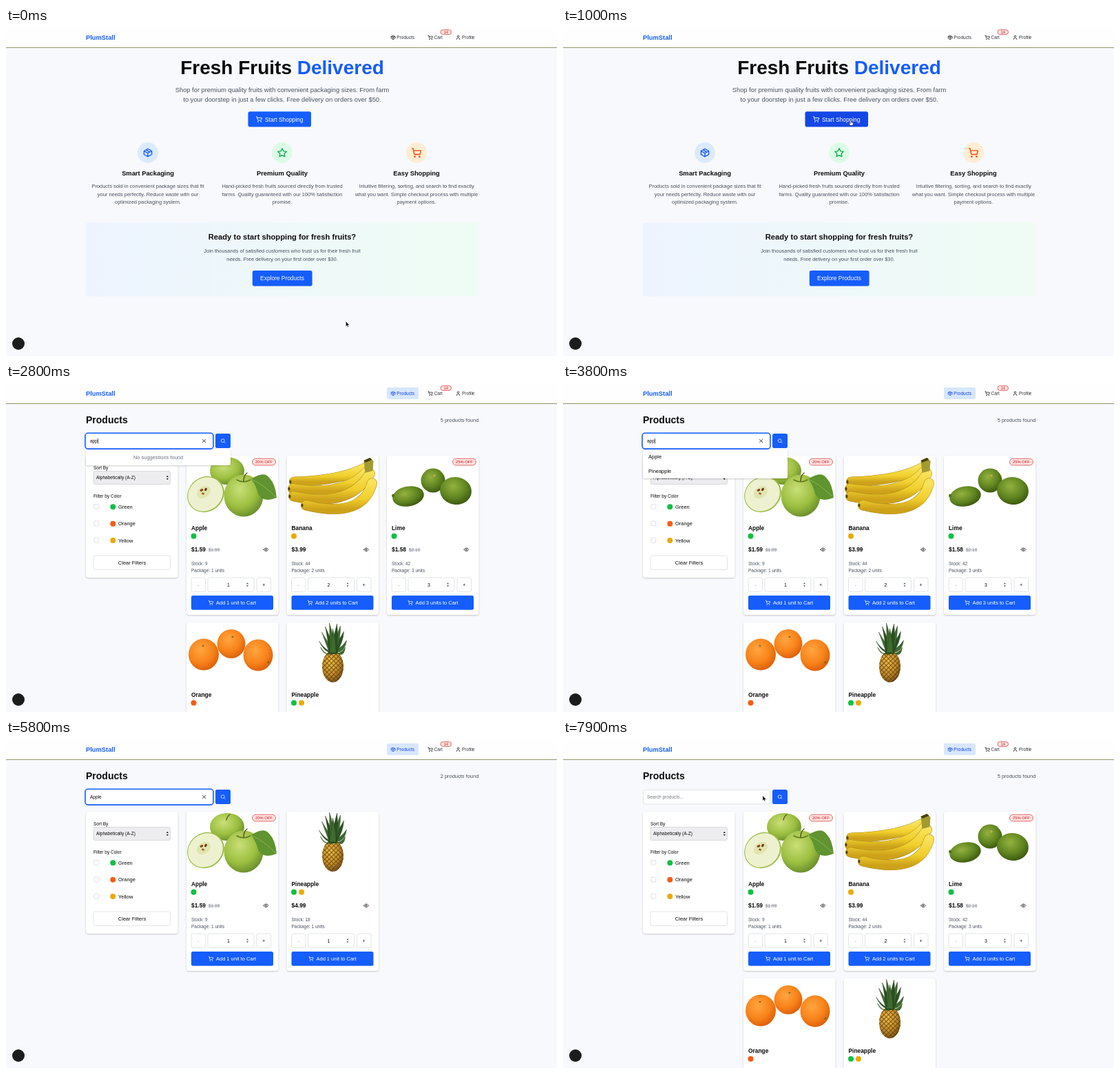
Write an HTML page that moves like this. It is 800x476 px and loops after 8 s.

```html
<!DOCTYPE html>
<html lang="en">
<head>
<meta charset="utf-8">
<title>Fruit store</title>
<style>
html, body { margin: 0; width: 100%; height: 100%; overflow: hidden; background: #f8f9fc; }
svg { display: block; width: 800px; height: 476px; font-family: "Liberation Sans", Arial, sans-serif; }
.card { filter: drop-shadow(0 1px 1.2px #0003); }
.b { font-weight: bold; }
.m { text-anchor: middle; }
.e { text-anchor: end; }
.s { text-decoration: line-through; }
</style>
</head>
<body>
<svg viewBox="0 0 800 476">
  <defs id="defs"></defs>
  <g id="stage"></g>
</svg>
<script>
const BLUE = '#155dfc', DEEP = '#1447e6', INK = '#0c0c0e', GRAY = '#4a5260', PAPER = '#fff', LINE = '#e2e4e8';
const GREEN = '#0fc043', ORANGE = '#f75c10', YELLOW = '#eaaa08', RED = '#c8141c', PINK = '#ffe2e0';

// Drawing helpers
const text = (s, x, y, size, fill = INK, cls = '') =>
  `<text x="${x}" y="${y}" font-size="${size}" fill="${fill}" class="${cls}">${s}</text>`;
const rect = (x, y, w, h, r, fill, stroke = 'none', more = '') =>
  `<rect x="${x}" y="${y}" width="${w}" height="${h}" rx="${r}" fill="${fill}" stroke="${stroke}" ${more}/>`;
const oval = (x, y, rx, ry, fill, turn = 0) =>
  `<ellipse cx="${x}" cy="${y}" rx="${rx}" ry="${ry}" fill="${fill}" transform="rotate(${turn} ${x} ${y})"/>`;
const path = (d, fill, stroke = 'none', w = 1) =>
  `<path d="${d}" fill="${fill}" stroke="${stroke}" stroke-width="${w}" stroke-linecap="round" stroke-linejoin="round"/>`;
const move = (x, y, s) => `<g transform="translate(${x} ${y})">${s}</g>`;
const dot = (x, y, fill) => oval(x, y, 4, 4, fill);

const ring = (x, y, r) => `M${x - r} ${y}a${r} ${r} 0 1 0 ${2 * r} 0a${r} ${r} 0 1 0 ${-2 * r} 0`;
const ICONS = {
  box: 'M21 8 12 3 3 8v8l9 5 9-5zM3 8l9 5 9-5M12 13v8M7.5 5.5l9 5',
  cart: ring(8, 21, 1) + ring(19, 21, 1) +
    'M2 2h2l2.7 12.4a2 2 0 0 0 2 1.6h9.8a2 2 0 0 0 2-1.6l1.6-7.4H5.1',
  user: 'M19 21v-2a4 4 0 0 0-4-4H9a4 4 0 0 0-4 4v2' + ring(12, 7, 4),
  star: 'M12 2l3.1 6.3 6.9 1-5 4.9 1.2 6.8-6.2-3.2L5.8 21 7 14.2 2 9.3l6.9-1z',
  search: ring(11, 11, 8) + 'M21 21l-4.3-4.3',
  eye: 'M2 12s3.5-7 10-7 10 7 10 7-3.5 7-10 7S2 12 2 12z' + ring(12, 12, 3),
  cross: 'M5 5l14 14M19 5L5 19'
};
const icon = (name, cx, cy, size, color, w = 2.2) =>
  `<g transform="translate(${cx - size / 2} ${cy - size / 2}) scale(${size / 24})">${path(ICONS[name], 'none', color, w)}</g>`;
const arrows = (x, y, c) => path(`M${x - 1.6} ${y - 1}l1.6-2 1.6 2zM${x - 1.6} ${y + 1}l1.6 2 1.6-2z`, c);
const pill = (s, x, y, w, h, size) =>
  rect(x, y, w, h, h / 2, PINK, '#d8484a', 'stroke-width=".8"') + text(s, x + w / 2, y + h / 2 + size * .36, size, RED, 'm');

// Shading for the fruit
const shade = (id, a, b, c) => `<radialGradient id="${id}" cx=".4" cy=".35" r=".7">
  <stop stop-color="${a}"/><stop offset=".6" stop-color="${b}"/><stop offset="1" stop-color="${c}"/></radialGradient>`;
document.getElementById('defs').innerHTML =
  shade('apple', '#c9df78', '#9cbf40', '#64892a') +
  shade('orange', '#ffa640', '#f8821a', '#d95c08') +
  shade('lime', '#93b23e', '#5f8420', '#38540e') +
  shade('pine', '#eebc42', '#c58b28', '#6d4814') +
  `<linearGradient id="banana" x2="0" y2="1"><stop stop-color="#f8e25a"/>
   <stop offset=".6" stop-color="#f1cf2c"/><stop offset="1" stop-color="#cda21a"/></linearGradient>
   <linearGradient id="cta"><stop stop-color="#edf4ff"/><stop offset="1" stop-color="#effcf4"/></linearGradient>
   <pattern id="scales" width="4.6" height="4.6" patternUnits="userSpaceOnUse" patternTransform="rotate(45)">
   <path d="M0 0H4.6M0 0V4.6" stroke="#5b3f14" stroke-width="1.6"/></pattern>`;

// One banana: a thick curve with a dark tip
const finger = ([x, y, cx, cy, ex, ey]) => {
  const d = `M${x} ${y}Q${cx} ${cy} ${ex} ${ey}`;
  return path(d, 'none', '#a9871c', 15) + path(d, 'none', 'url(#banana)', 14) + oval(x - 5.5, y, 1.5, 2.6, '#4f461a');
};

// Fruit pictures, relative to the top left corner of a card
const FRUIT = {
  Apple: oval(59, 22, 25, 20, 'url(#apple)') +
    path('M58 12q1-5 5-8', 'none', '#5d5220', 1.3) +
    oval(83, 58, 28.5, 30.5, 'url(#apple)') +
    path('M73 35q10 6 20 0', 'none', '#5f7e1c', 1.5) +
    path('M83 37q0-8 5-12', 'none', '#5d5220', 1.5) +
    oval(28, 56, 28, 25, '#9bbd48', -38) + oval(27.5, 56, 26.5, 23.5, '#eef1cf', -38) +
    oval(25, 53, 11, 8, '#e0e4ae', -38) +
    oval(22, 50, 2.5, 1.7, '#87471a', -25) + oval(28, 49, 2.4, 1.6, '#6b3510', -55) +
    oval(24, 55, 2, 1.4, '#9a5c22', 20) +
    path('M94 34Q113 21 121 33Q129 41 131 61Q110 69 104 55Q101 43 94 34z', '#5f9430') +
    path('M94 34Q112 42 131 61', 'none', '#a3c25a', .7),
  Banana: [[11, 38, 80, 36, 115, 17], [9, 48, 84, 60, 118, 22], [10, 59, 92, 76, 121, 26], [28, 72, 110, 92, 124, 40]]
    .map(finger).join('') + path('M112 7l9-4 5 5-1 14-11 3z', '#a39a30') + path('M112 7l9-4 3 3-10 4z', '#48420e'),
  Lime: oval(67, 36, 17.5, 17.5, 'url(#lime)') + oval(31, 59, 23, 14.5, 'url(#lime)', -10) +
    oval(9, 58, 2, 2.5, '#50701a') + oval(100, 51, 23, 20, 'url(#lime)', 8) +
    oval(69, 29, 1.7, 1.7, '#c4ac50'),
  Orange: oval(65, 31, 20.5, 21, 'url(#orange)') + oval(25, 46.5, 22, 23, 'url(#orange)') +
    oval(104, 47.5, 21.5, 23, 'url(#orange)') +
    oval(24, 34, 1.6, 1, '#7c641a') + oval(67, 21, 1.6, 1, '#7c641a') + oval(119, 58, 1.5, 1.5, '#7c641a'),
  Pineapple: oval(67, 64, 15.5, 23, 'url(#pine)') + oval(67, 64, 15.5, 23, 'url(#scales)') +
    [-20, 20, -16, 16, -18, 18, -11, 11, -5, 6, 0].map((dx, i) => {
      const tip = [27, 26, 14, 13, 36, 36, 6, 5, 1, 2, 9][i];
      return path(`M62 44Q${66 + dx * .65} ${tip + 13} ${67 + dx} ${tip}Q${71 + dx * .7} ${tip + 16} 72 44z`,
        i % 3 ? '#3f6a30' : '#2a5024', '#1d380f', .4);
    }).join('')
};

// [name, colours, price, old price, discount, stock, package size]
const ITEMS = [
  ['Apple', [GREEN], '$1.59', '$1.99', '20% OFF', 9, 1],
  ['Banana', [YELLOW], '$3.99', '', '', 44, 2],
  ['Lime', [GREEN], '$1.58', '$2.10', '25% OFF', 42, 3],
  ['Orange', [ORANGE], '$2.49', '', '', 30, 4],
  ['Pineapple', [GREEN, YELLOW], '$4.99', '', '', 18, 1]
];

function card([name, colors, price, old, off, stock, pack], slot) {
  const many = pack > 1, left = many ? 30.5 : 32;
  return move(262 + slot % 3 * 145.5, 104 + Math.floor(slot / 3) * 242,
    rect(0, 0, 133.5, 231, 4, PAPER, 'none', 'class="card"') + FRUIT[name] +
    (off && pill(off, 95.5, 4.3, 34, 9.6, 5.8)) +
    text(name, 7, 107.5, 8.4, INK, 'b') +
    colors.map((c, i) => dot(10.5 + i * 11, 116.8, c)).join('') +
    text(price, 7, 139.3, 8.4, INK, 'b') + text(old, 32, 138.8, 6.53, '#7c828c', 's') +
    icon('eye', 115.5, 136.3, 8, INK) +
    text('Stock: ' + stock, 7, 159.4, 6.53, GRAY) +
    text(`Package: ${pack} units`, 7, 169, 6.53, GRAY) +
    rect(7, 177, 20.5, 20.5, 2.5, 'none', LINE) + text('-', 17.3, 189.5, 6.5, '#85878c', 'm') +
    rect(31, 177, 67, 20.5, 2.5, 'none', LINE) + text(pack, 61, 189.7, 7, INK, 'm') +
    arrows(88.5, 187.3, '#55565a') +
    rect(102, 177, 20.5, 20.5, 2.5, 'none', LINE) + text('+', 112.2, 189.5, 6.5, INK, 'm') +
    rect(7, 203, 119, 20.8, 2.5, BLUE) + icon('cart', left + 3.5, 213.3, 7.5, '#fff') +
    text(`Add ${pack} unit${many ? 's' : ''} to Cart`, left + 11, 216, 7.47, '#fff'));
}

// Fixed parts of both pages
const header = active =>
  rect(0, 0, 800, 28, 0, '#fefefe') + path('M0 28.5H800', 'none', '#94966c') +
  text('PlumStall', 116, 17, 9.33, BLUE, 'b') +
  (active ? rect(553, 5, 46, 17, 2.5, '#d7e7fd') : '') +
  icon('box', 562, 13.7, 7.6, active ? DEEP : INK) +
  text('Products', 567.3, 16.2, 6.53, active ? DEEP : '#33363e') +
  icon('cart', 616.2, 13.7, 7.6, INK) + text('Cart', 621.5, 16.2, 6.53, '#33363e') +
  icon('user', 656.5, 13.7, 7.6, INK) + text('Profile', 662, 16.2, 6.53, '#33363e') +
  pill('14', 631, 2.6, 15.5, 6.8, 5.6);

const feature = (x, name, color, back, title, lines) =>
  oval(x, 181, 15, 15, back) + icon(name, x, 181, 15, color) + text(title, x, 213.5, 9.33, INK, 'b m') +
  lines.map((s, i) => text(s, x, 232.3 + i * 11.3, 7.47, GRAY, 'm')).join('');

const home = hover => header(false) +
  text(`Fresh Fruits <tspan fill="${BLUE}">Delivered</tspan>`, 401, 67.3, 28, INK, 'b m') +
  text('Shop for premium quality fruits with convenient packaging sizes. From farm', 401, 93.3, 9.33, GRAY, 'm') +
  text('to your doorstep in just a few clicks. Free delivery on orders over $50.', 401, 106.6, 9.33, GRAY, 'm') +
  rect(351.5, 121.3, 91.5, 22.3, 2.8, hover ? DEEP : BLUE) +
  icon('cart', 367.5, 132.4, 9.5, '#fff') + text('Start Shopping', 376, 135.5, 8.4, '#fff') +
  feature(206, 'box', BLUE, '#dbeafe', 'Smart Packaging', ['Products sold in convenient package sizes that fit',
    'your needs perfectly. Reduce waste with our', 'optimized packaging system.']) +
  feature(401, 'star', '#0ca64a', '#dcfce7', 'Premium Quality', ['Hand-picked fresh fruits sourced directly from trusted',
    'farms. Quality guaranteed with our 100% satisfaction', 'promise.']) +
  feature(596, 'cart', '#f54a0a', '#ffedd4', 'Easy Shopping', ['Intuitive filtering, sorting, and search to find exactly',
    'what you want. Simple checkout process with multiple', 'payment options.']) +
  rect(116, 282.5, 570.5, 107, 4, 'url(#cta)') +
  text('Ready to start shopping for fresh fruits?', 401, 307, 11.2, INK, 'b m') +
  text('Join thousands of satisfied customers who trust us for their fresh fruit', 401, 326.3, 7.47, GRAY, 'm') +
  text('needs. Free delivery on your first order over $30.', 401, 337.5, 7.47, GRAY, 'm') +
  rect(357.8, 352, 86.8, 22.5, 2.8, BLUE) + text('Explore Products', 401, 366.2, 8.4, '#fff', 'm');

const sidebar = rect(116, 104, 133.5, 177, 4, PAPER, 'none', 'class="card"') +
  text('Sort By', 127, 123.6, 6.53) + rect(127, 126.5, 111.5, 19, 2.5, '#ededf0', '#d9dade') +
  text('Alphabetically (A-Z)', 131, 138.4, 6.53) + arrows(234.3, 136, INK) +
  text('Filter by Color', 127, 164.8, 6.53) +
  [['Green', GREEN], ['Orange', ORANGE], ['Yellow', YELLOW]].map(([s, c], i) => {
    const y = 178.3 + i * 24.4;
    return rect(128, y - 3.7, 6.8, 6.8, 1.2, 'none', '#d6d8dc', 'stroke-width=".8"') + dot(155.3, y, c) +
      text(s, 163, y + 2.7, 7.47);
  }).join('') +
  rect(127, 249, 111.5, 20.5, 2.8, 'none', LINE) + text('Clear Filters', 183, 261.7, 7.47, INK, 'm');

const shopTop = header(true) + text('Products', 116, 57.2, 14, INK, 'b') + sidebar +
  rect(304, 72, 22, 21, 2.8, BLUE) + icon('search', 315, 82.6, 7.5, '#fff');
const list = items => text(items.length + ' products found', 686.3, 55.1, 7.47, GRAY, 'e') + items.map(card).join('');
const everything = list(ITEMS), matches = list([ITEMS[0], ITEMS[4]]);

const field = (value, focus, caret) =>
  rect(116.5, 72.5, 184, 20.5, 3, PAPER, LINE) +
  (focus ? rect(115, 71.3, 186, 22.8, 4, PAPER, BLUE, 'stroke-width="1.6"') : '') +
  (value ? text(value, 122, 85, 6.53) + icon('cross', 287.6, 82.6, 7, INK, 3)
    : text('Search products...', 122, 85, 6.53, '#757880')) +
  (caret ? path(`M${122.6 + value.length * 3.63} 79.3v7`, 'none', INK, .7) : '');

const panel = h => rect(116, 95.5, 210, h, 2.5, PAPER, 'none', 'class="card"');
const noHits = panel(22.5) + text('No suggestions found', 221, 108.9, 7.47, '#6a7180', 'm');
const hits = picked => panel(41.5) + (picked ? rect(116, 95.5, 210, 20.7, 2, '#f1f2f4') : '') +
  text('Apple', 124, 108.2, 7.47) + text('Pineapple', 124, 128.8, 7.47);

// Pointer
const POINTERS = {
  arrow: path('M0 0V7L1.6 5.6 2.7 8 3.8 7.5 2.8 5.2H5z', '#000', '#fff', .4),
  hand: path('M-.7 0Q0-1 .7 0V2.7L3 3.3Q4 3.6 3.7 5L3 7.5H-.6L-2.6 4.6Q-2.3 3.4-.7 4.6z', '#fff', '#111', .6),
  beam: path('M-1.3-3.7Q0-3.7 0-2.7V2.7Q0 3.7-1.3 3.7M1.3-3.7Q0-3.7 0-2.7M0 2.7Q0 3.7 1.3 3.7', 'none', INK, .8)
};
const OPEN = 1200, TYPE = 2200, REPLY = 3800, PICK = 4700, ENTER = 5300, WAKE = 6300, CLEAR = 7300;
const STOPS = [[0, 493.5, 426], [700, 417.7, 134], [OPEN, 417.7, 134], [1700, 207, 91],
  [WAKE, 207, 91], [7000, 288, 82], [CLEAR, 288, 82], [7900, 290, 81]];

function pointer(t) {
  if (t >= TYPE && t < WAKE) return '';
  const i = Math.max(1, STOPS.findIndex(s => s[0] >= t));
  const [t0, x0, y0] = STOPS[i - 1], [t1, x1, y1] = STOPS[i];
  const u = (t - t0) / (t1 - t0), k = u * u * (3 - 2 * u);
  const x = x0 + (x1 - x0) * k, y = y0 + (y1 - y0) * k;
  const onButton = t < OPEN && y > 121 && y < 143.5;
  const onField = t >= OPEN && y > 72 && y < 95 && x < 283;
  const onCross = t >= WAKE && t < CLEAR && x >= 283;
  return move(x, y, POINTERS[onButton || onCross ? 'hand' : onField ? 'beam' : 'arrow']);
}

function shop(t) {
  const focus = t >= 1900 && t < CLEAR;
  const value = t < TYPE || t >= CLEAR ? '' : t >= ENTER ? 'Apple' : 'app'.slice(0, 1 + Math.floor((t - TYPE) / 200));
  const since = t - [ENTER, 2600, TYPE, 1900].find(s => t >= s);
  const caret = focus && since % 1000 < 500;
  const drop = t < TYPE || t >= ENTER ? '' : t < REPLY ? noHits : hits(t >= PICK);
  return shopTop + (t >= ENTER + 100 && t < CLEAR + 100 ? matches : everything) + field(value, focus, caret) + drop;
}

const badge = oval(18, 458, 9, 9, '#1c1c1e');
const stage = document.getElementById('stage');
let shown = -1;
function tick(now) {
  const t = Math.floor(now % 8000 / 100) * 100;
  if (t !== shown) {
    shown = t;
    stage.innerHTML = (t < OPEN ? home(t >= 600) : shop(t)) + badge + pointer(t);
  }
  requestAnimationFrame(tick);
}
tick(0);
</script>
</body>
</html>
```
